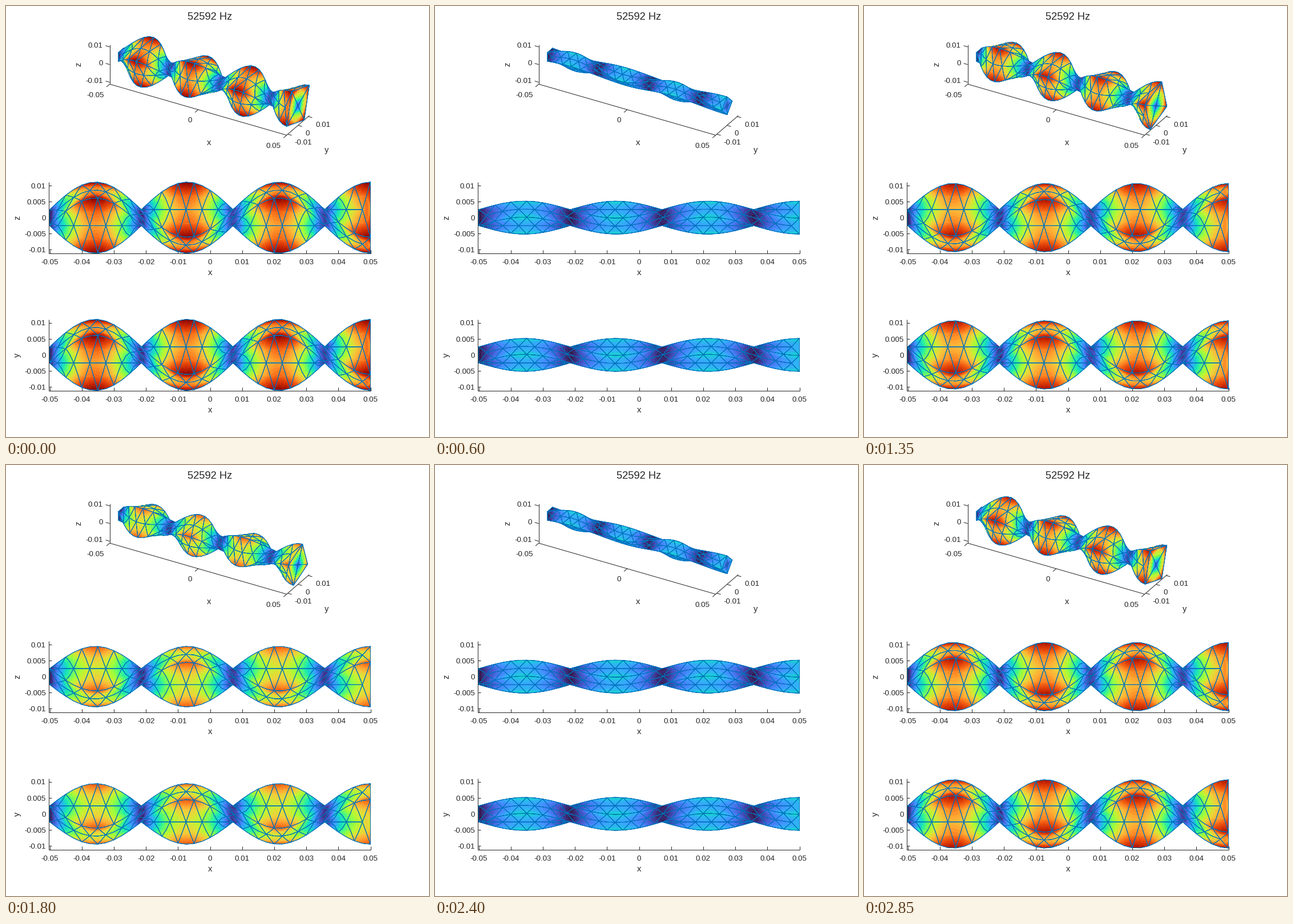
Write a matplotlib script that moves like this. It is 741 px wide and 756 px high and loops after 3 s.

```python
import numpy as np
import matplotlib as mpl
import matplotlib.pyplot as plt
from matplotlib.animation import FuncAnimation
from matplotlib.collections import PolyCollection

W, H, DPI = 741, 756, 64
PT = 72 / DPI                      # points per pixel
FRAMES, INTERVAL = 20, 150

LENGTH, HALF = 0.1, 0.0025         # square bar: length and half width
CELLS = 20
LIMIT = 0.0111                     # axis limit across the bar
TWIST = LIMIT / HALF - 1           # peak of the linearised rotation
WAVE = 3.5 * np.pi / LENGTH        # fourth torsion mode, clamped at the left

BANDS = 48
BAND_COLORS = mpl.colormaps["turbo"]((np.arange(BANDS) + 0.5) / BANDS)
EDGE = (0, 0.447, 0.741, 1)
EDGE_WIDTH, SEAM_WIDTH = 0.85 * PT, 0.5 * PT
INK = "#262626"

# azimuth, elevation, pixels per unit, origin in pixels
VIEWS = [
    (30, 30, 3580, (356.5, 130.2)),
    (0, 0, 5620, (357.5, 371.2)),
    (0, 90, 5620, (357.5, 612)),
]


def build_mesh():
    """Nodes and inward-wound triangles of the bar surface."""
    ring = np.array([(-1, -1), (1, -1), (1, 1), (-1, 1)])
    mids = (ring + np.roll(ring, -1, axis=0)) / 2
    step = LENGTH / CELLS
    nodes = [(-LENGTH / 2 + k * step, *p) for k in range(CELLS + 1) for p in ring]
    nodes += [(-LENGTH / 2 + (k + 0.5) * step, *p) for k in range(CELLS) for p in mids]
    nodes += [(-LENGTH / 2, 0, 0), (LENGTH / 2, 0, 0)]
    first_mid = 4 * (CELLS + 1)
    left, right = len(nodes) - 2, len(nodes) - 1

    tris = []
    for j in range(4):
        a = [4 * k + j for k in range(CELLS + 1)]
        b = [4 * k + (j + 1) % 4 for k in range(CELLS + 1)]
        m = [first_mid + 4 * k + j for k in range(CELLS)]
        for k in range(CELLS):
            tris += [(a[k], a[k + 1], m[k]), (b[k + 1], b[k], m[k])]
        for k in range(CELLS - 1):
            tris += [(a[k + 1], m[k + 1], m[k]), (b[k + 1], m[k], m[k + 1])]
        tris += [(a[0], m[0], b[0]), (a[-1], b[-1], m[-1])]
        tris += [(left, a[0], b[0]), (right, b[-1], a[-1])]
    nodes = np.array(nodes, float)
    nodes[:, 1:] *= HALF
    return nodes, np.array(tris)


def split(nodes, tris):
    """Add mid-side nodes; each triangle becomes a centre and three corners."""
    n = len(nodes)
    a, b, c = tris.T
    ab, bc, ca = (n + i * len(tris) + np.arange(len(tris)) for i in range(3))
    sides = [(nodes[p] + nodes[q]) / 2 for p, q in ((a, b), (b, c), (c, a))]
    parts = [(ab, bc, ca), (a, ab, ca), (b, bc, ab), (c, ca, bc)]
    parts = np.array(parts).transpose(2, 0, 1).reshape(-1, 3)
    return np.concatenate([nodes, *sides]), parts


CORNERS, FACETS = build_mesh()
NODES, TRIS = split(CORNERS, FACETS)
OUTLINED = np.arange(len(TRIS)) % 4 > 0


def deform(phase):
    """Deformed nodes and their displacement relative to the maximum."""
    x, y, z = NODES.T
    shape = -np.cos(phase) * np.sin(WAVE * (x + LENGTH / 2))
    turn = TWIST * shape
    moved = np.column_stack([x, y - turn * z, z + turn * y])
    size = np.abs(shape) * np.hypot(y, z) / (HALF * np.sqrt(2))
    return moved, size


def project(points, view):
    """Screen positions in pixels and depth towards the viewer."""
    az, el, scale, (ox, oy) = view
    az, el = np.radians([az, el])
    x, y, z = points.T
    sx = np.cos(az) * x + np.sin(az) * y
    back = np.cos(az) * y - np.sin(az) * x
    up = np.sin(el) * back + np.cos(el) * z
    depth = np.sin(el) * z - np.cos(el) * back
    return np.column_stack([ox + scale * sx, oy - scale * up]), depth


def shade(pts, vals, outlined):
    """Nested colour bands, then the two outer sides of each triangle."""
    count = len(pts)
    order = np.argsort(vals, axis=1)
    v = np.take_along_axis(vals, order, 1)
    p = np.take_along_axis(pts, order[:, :, None], 1)
    t = np.arange(1, BANDS) / BANDS
    v0, v1, v2 = (v[:, i, None] for i in range(3))
    p0, p1, p2 = (p[:, i, None, :] for i in range(3))

    def cut(pa, pb, va, vb):
        w = np.clip((t - va) / np.maximum(vb - va, 1e-9), 0, 1)
        return pa + (pb - pa) * w[..., None]

    low = (t < v1)[..., None]
    polys = np.empty((count, BANDS + 1, 4, 2))
    polys[:, 0] = p[:, [0, 1, 2, 2]]
    polys[:, 1:-1, 0] = cut(p0, p2, v0, v2)
    polys[:, 1:-1, 1] = np.where(low, cut(p0, p1, v0, v1), cut(p1, p2, v1, v2))
    polys[:, 1:-1, 2] = np.where(low, p1, p2)
    polys[:, 1:-1, 3] = p2
    polys[:, -1] = pts[:, [2, 0, 1, 0]]

    used = np.ones((count, BANDS + 1), bool)
    used[:, 1:-1] = (t > v0) & (t < v2)
    used[:, -1] = outlined
    fill = np.zeros((count, BANDS + 1, 4))
    fill[:, :-1] = BAND_COLORS
    fill[:, 0] = BAND_COLORS[np.clip((v[:, 0] * BANDS).astype(int), 0, BANDS - 1)]
    edge = fill.copy()
    edge[:, -1] = EDGE
    line = np.zeros((count, BANDS + 1))
    line[:, 0] = SEAM_WIDTH
    line[:, -1] = EDGE_WIDTH
    return polys[used], fill[used], edge[used], line[used]


def render(moved, size, view):
    flat, depth = project(moved, view)
    pts = flat[TRIS]
    e1, e2 = pts[:, 1] - pts[:, 0], pts[:, 2] - pts[:, 0]
    front = np.flatnonzero(e1[:, 0] * e2[:, 1] - e1[:, 1] * e2[:, 0] > 0.05)
    facet_depth = depth[FACETS].mean(axis=1)[front // 4]
    front = front[np.argsort(facet_depth, kind="stable")]
    return shade(pts[front], size[TRIS[front]], OUTLINED[front])


fig = plt.figure(figsize=(W / DPI, H / DPI), dpi=DPI, facecolor="white")
ax = fig.add_axes([0, 0, 1, 1])
ax.set_xlim(0, W)
ax.set_ylim(H, 0)
ax.axis("off")


def label(x, y, text, px=13.33, ha="center", rise=0.35, **kw):
    """Text whose glyphs are centred on y."""
    ax.text(x, y + rise * px, text, fontsize=px * PT, family="Liberation Sans",
            color=INK, ha=ha, va="baseline", **kw)


def name(x, y, text, upright=True):
    px = 14.67
    if upright:
        label(x, y, text, px, rise=0.155 if text == "y" else 0.26)
    else:
        ax.text(x, y, text, fontsize=px * PT, family="Liberation Sans",
                color=INK, ha="center", va="center", rotation=90)


def rule(x0, y0, x1, y1):
    ax.plot([x0, x1], [y0, y1], color=INK, lw=PT, zorder=1,
            solid_capstyle="butt")


def flat_axes(view, side):
    _, _, scale, (ox, oy) = view
    left, base = 74.5, np.floor(oy + scale * LIMIT) + 0.5
    rule(left, oy - scale * LIMIT, left, base)
    rule(left, base, ox + scale * LENGTH / 2, base)
    for i in range(-5, 6):
        x = ox + scale * i / 100
        rule(x, base, x, base - 5.6)
        label(x, base + 14.5, f"{i / 100:.2f}" if i else "0")
    for i in range(-2, 3):
        y = oy - scale * i / 200
        rule(left, y, left + 5.6, y)
        label(70, y, f"{i / 200:g}", ha="right")
    name(358, base + 34.5, "x")
    name(20, oy, side, upright=False)


def solid_axes(view):
    def at(x, y, z=-LIMIT):
        return project(np.array([[x, y, z]]), view)[0][0]

    def tick(p, dx, dy):
        rule(*p, p[0] + dx, p[1] + dy)

    end = LENGTH / 2
    corner = at(end, -LIMIT)
    rule(*at(-end, -LIMIT, LIMIT), *at(-end, -LIMIT))
    rule(*at(-end, -LIMIT), *corner)
    rule(*corner, *at(end, LIMIT))
    for x, text, dx in ((-end, "-0.05", -24.5), (0, "0", -14), (end, "0.05", -23)):
        p = at(x, -LIMIT)
        tick(p, -5.5, 4.8)
        label(p[0] + dx, p[1] + 18, text)
    for y, text, dx in ((-0.01, "-0.01", 27.5), (0, "0", 16.5), (0.01, "0.01", 26)):
        p = at(end, y)
        tick(p, 7, 2)
        label(p[0] + dx, p[1] + 13, text)
    for z, text in ((-0.01, "-0.01"), (0, "0"), (0.01, "0.01")):
        p = at(-end, -LIMIT, z)
        tick(p, -7, -2)
        label(169.5, p[1] - 3, text, ha="right")
    name(355.5, 240, "x")
    name(561.5, 254.5, "y")
    name(127, 102, "z", upright=False)


label(357, 18, "52592 Hz", 18.3)
solid_axes(VIEWS[0])
flat_axes(VIEWS[1], "z")
flat_axes(VIEWS[2], "y")

surface = PolyCollection([], zorder=2, snap=False, joinstyle="round")
ax.add_collection(surface, autolim=False)


def draw(i):
    moved, size = deform(2 * np.pi * i / FRAMES)
    parts = [render(moved, size, view) for view in VIEWS]
    polys, fill, edge, line = (np.concatenate(group) for group in zip(*parts))
    surface.set_verts(polys)
    surface.set_facecolor(fill)
    surface.set_edgecolor(edge)
    surface.set_linewidth(line)
    return [surface]


anim = FuncAnimation(fig, draw, frames=FRAMES, interval=INTERVAL, repeat=True)
plt.show()
```
